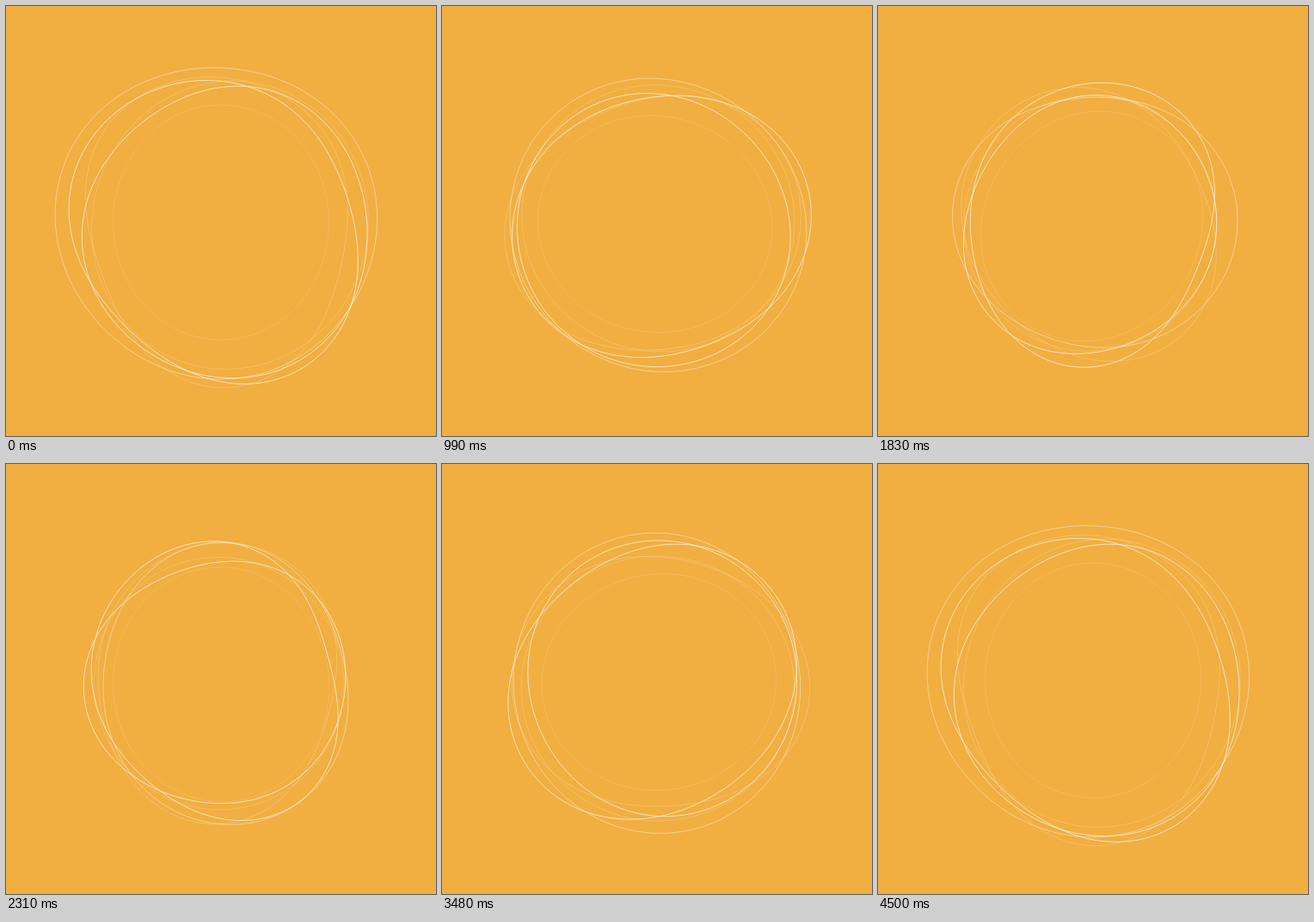
Animation, 500 px wide and 500 px high, one loop 4530 ms. Source, as an HTML page:

```html
<!DOCTYPE html>
<html lang="en">
<head>
<meta charset="utf-8">
<title>Drifting rings</title>
<style>
  html, body { margin: 0; width: 100%; height: 100%; overflow: hidden; background: #f1ae41; }
  svg { display: block; width: 100%; height: 100%; }
  path { fill: none; stroke: #fff; stroke-width: 1; stroke-linejoin: round; }
</style>
</head>
<body>
<svg id="stage" viewBox="0 0 500 500"></svg>
<script>
const LOOP = 4530, TURN = 4500, STEP = 30;
const CX = 250, CY = 254, POINTS = 144, TAU = 2 * Math.PI;
const stage = document.getElementById('stage');

// Every ring turns a whole number of times per loop while it shrinks and swells once.
// Waves are [cos, sin] amplitudes for one, two and three lobes:
// "rest" shapes the ring at its mean size, "swell" is added at its widest.
const rings = [
  { alpha: 0.13, turns: -1, radius: 131, growth: 0,
    rest: [[0, -2.4], [-5.5, 0]], swell: [] },
  { alpha: 0.18, turns: -1, radius: 155, growth: 9,
    rest: [[6.5, 0], [-2, -0.8]], swell: [[4, 1], [-1.2, -1.2]] },
  { alpha: 0.21, turns: 1, radius: 158, growth: 7.5,
    rest: [[0.5, 2], [-14, 1.5], [0.5, -2]], swell: [[-4.4, 0.5], [-0.8, 2.8], [-0.6, -5]] },
  { alpha: 0.42, turns: 2, radius: 168.4, growth: 15.6,
    rest: [[0.5, -0.6], [-3.2, 4]], swell: [[-5.5, -2.7], [6.2, -2.5], [-0.5, -2.2]] },
  { alpha: 0.64, turns: 1, radius: 156.7, growth: 10.4,
    rest: [[5.9, 4.8], [1.8, -2.8]], swell: [[1.9, 5.3], [-3.5, 1.2], [-3.4, 0.8]] },
  { alpha: 0.64, turns: -1, radius: 160.5, growth: 9.6,
    rest: [[-0.4, 4.1], [-8.2, 10.7], [0, -0.9]], swell: [[-5.2, 3.1], [3.5, 2.2], [-4.8, 0]] }
];

for (const ring of rings) {
  ring.path = document.createElementNS('http://www.w3.org/2000/svg', 'path');
  ring.path.setAttribute('stroke-opacity', ring.alpha);
  stage.appendChild(ring.path);
}

function wave(waves, angle) {
  return waves.reduce((sum, [c, s], i) =>
    sum + c * Math.cos((i + 1) * angle) + s * Math.sin((i + 1) * angle), 0);
}

function outline(ring, phase) {
  const size = Math.cos(phase);
  const points = [];
  for (let i = 0; i < POINTS; i++) {
    const angle = TAU * i / POINTS;
    const r = ring.radius + wave(ring.rest, angle) +
              size * (ring.growth + wave(ring.swell, angle));
    const dir = angle + ring.turns * phase;
    points.push((CX + r * Math.cos(dir)).toFixed(2) + ' ' + (CY + r * Math.sin(dir)).toFixed(2));
  }
  return 'M' + points.join('L') + 'Z';
}

function draw(ms) {
  const t = Math.floor(ms % LOOP / STEP) * STEP;
  for (const ring of rings) ring.path.setAttribute('d', outline(ring, TAU * t / TURN));
}

const start = performance.now();
function tick() {
  draw(performance.now() - start);
  requestAnimationFrame(tick);
}
tick();
</script>
</body>
</html>
```
